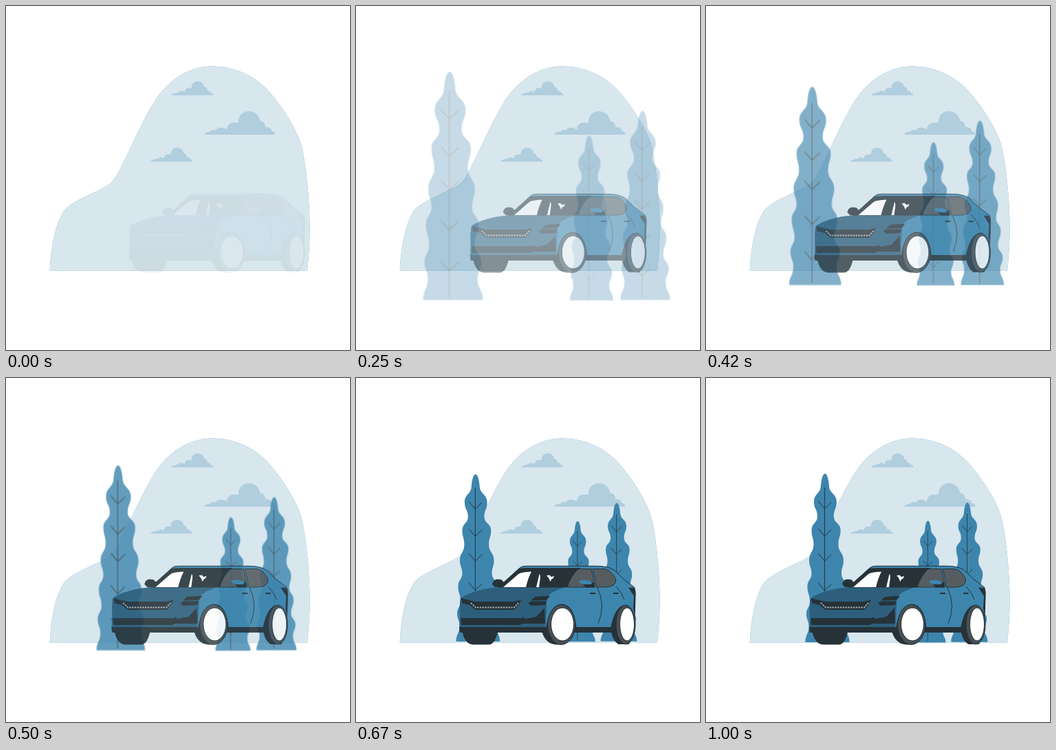
An HTML page for the animation above (1040 ms loop, 500x500 px).

```html
<!DOCTYPE html>
<html lang="en">
<head>
<meta charset="utf-8">
<title>Car arriving</title>
<style>
  html, body { margin: 0; width: 100%; height: 100%; overflow: hidden; background: #fff; }
  svg { display: block; width: 100vw; height: 100vh; }
  .blue { fill: #3d85ad; }
  .shade { fill: #2d5f7c; }
  .dark { fill: #263238; }
  .glass { fill: #565d61; stroke: #263238; }
  .tyre { fill: #465055; stroke: #263238; }
  .white { fill: #fff; }
  .line { fill: none; stroke: #263238; }
</style>
</head>
<body>
<svg viewBox="0 0 500 500">
  <defs>
    <path id="blob" d="M63.700 384.500C66 345 72 317 84 298C98 281 132 272 152 258C167 244 188 184 215 140C236 106 268 87.500 300 87.500C330 88 356 99 375 117C395 136 423 177 430 205C437 236 442 290 441.500 326C441.500 345 440 365 438 384.500Z"/>
    <path id="cloud" fill="#b1cede" d="M0 34C2 30 6 29 9 30C10 27 14 26 17 28C19 23 28 22 33 27C33 20 39 15 44 17C46 16 48 16 50 17C49 7 56 0 65 0C74 0 81 7 81 14C86 14 89 18 89 23C95 23 99 26 98 29C102 29 104 32 103 34Z"/>
    <g id="tree">
      <path id="leaf" class="blue"/>
      <path id="veins" class="line"/>
    </g>
  </defs>

  <use href="#blob" class="blue"/>
  <use href="#blob" fill="#fff" fill-opacity=".8"/>
  <use href="#cloud" transform="translate(240 109.5) scale(.594)"/>
  <use href="#cloud" transform="translate(288 153)"/>
  <use href="#cloud" transform="translate(210 206) scale(.594)"/>

  <g id="trees">
    <use href="#tree" transform="translate(172.9 139)"/>
    <use href="#tree" transform="translate(322.6 207.5) scale(.722)"/>
    <use href="#tree" transform="translate(379.9 181) scale(.828)"/>
  </g>

  <g id="car">
    <!-- far front tyre and body -->
    <path class="dark" d="M153.500 364H207Q203 387.500 193 387.500H170Q157 387 153.500 364Z"/>
    <path class="blue" d="M150.500 368L151 345Q150 330 153 319C165 311 185 306 208 304L238 276Q241 273 247 273H350Q366 273 375 279Q388 293 405 304.500Q407 308 406 318L405 348L403 366L370 370H285Z"/>
    <path class="line" d="M207 304L238 276Q241 273.300 247 273.300H350Q366 273.300 375 279Q388 293 405 304.500"/>
    <path class="shade" d="M152 320C165 311 185 306 208 304H305C290 308 282 313 277 319L277 333L275 364H150.500L151 345Q150 330 152 320Z"/>

    <!-- windscreen and windows -->
    <path class="dark" d="M206 304.500L237 277Q241 276 250 276H326Q312 288 307 304.500Z"/>
    <path class="white" d="M214 304L236 285Q239 282 255 281.500Q250 291 247 304Z"/>
    <path class="white" d="M262 304L266.500 285Q268.500 286 267.500 293L266 304ZM277 287L281.500 286.500L283.500 289L288 288Q287 292.500 284.500 292L282.500 296Q281 291 277 287Z"/>
    <path class="glass" d="M307 304Q312 288 323 277.500H342Q345.500 291 347 304Z"/>
    <path class="glass" d="M344 277.500H362Q370 279 377 291Q379 297 374 301Q370 304 362 304H349Q348 291 344 277.500Z"/>
    <path class="dark" d="M198 300Q199 293 205 292.500L211 293L215 297L208 304H202Z"/>
    <path class="dark" d="M329 299L341 296L347 298V304.500H334Z"/>
    <path class="blue" d="M324 295.500Q326 293 333 293.500Q343 294.500 343 298Q343 300.500 336 300Q326 300.500 324 295.500Z"/>

    <!-- grille and lamps -->
    <path class="dark" d="M163 322.500L173 325H230L240 322.500L237 329L230 337H174L166 331Z"/>
    <path fill="none" stroke="#a9b4b9" stroke-width="1.800" stroke-dasharray="2.400 1.400" d="M167 327L174 333.500H230L237 326"/>
    <path class="dark" d="M153 320L164 323L165 330L154 327Z"/>
    <path class="dark" d="M260 318L282 316.500L277 323L254 323.500ZM250 327L255 324.500H277L275 330L254 331Z"/>

    <!-- bumper and sills -->
    <path class="dark" d="M152 349H241L243 347L246 350L262 347L274 334L275 357L242 357L238 359H153Z"/>
    <path class="dark" d="M150 362H276L285 370H151ZM318 362H372V370H316Z"/>

    <!-- panel lines -->
    <path class="line" d="M351 305Q357 317 357.500 331Q357 345 352 357M378 303Q387 313 390 322"/>
    <path class="line" stroke-width="1.800" d="M340 313H348M374 313H381.500"/>
    <path class="dark" d="M396 304.500L405 305Q407 309 406.500 318L405.500 348L403 335L404 317Z"/>

    <!-- near wheels -->
    <path class="dark" d="M276 363C279 343 287 329 299 328.500C312 329 319 343 320.500 364L314 378L287 387Z"/>
    <path class="dark" d="M370 364C374 342 382 330 391 330C400 331 405 343 406 360L397 387H381Q372 381 370 364Z"/>
    <path class="dark" d="M270 368H286L299 387.500H290Q275 386 270 368Z"/>
    <ellipse class="tyre" cx="298.500" cy="358.500" rx="20" ry="29"/>
    <ellipse class="white" stroke="#263238" cx="300" cy="358" rx="16.500" ry="24"/>
    <ellipse class="tyre" cx="392" cy="358.500" rx="14" ry="28.500"/>
    <ellipse class="white" stroke="#263238" cx="394" cy="358" rx="10.500" ry="24"/>
  </g>
</svg>
<script>
  const byId = id => document.getElementById(id);

  // Half-widths of a tree from tip to foot: [y, left, right]
  const outline = [
    [17, 6, 6], [41, 16, 17], [62, 11, 12.8], [82, 19.5, 22.7], [103, 16.5, 19.5],
    [126, 23, 27], [145, 19.5, 24], [164, 25.5, 31], [186, 22, 27],
    [204, 27, 34], [222, 23.5, 30], [245, 28.5, 35.7]
  ];
  const left = outline.map(([y, l]) => [-l, y]).reverse();
  const right = outline.map(([y, , r]) => [r, y]);

  // Waves whose tangents are vertical at every point
  const wave = pts => pts.slice(1).map(([x, y], i) => {
    const [px, py] = pts[i], mid = (y + py) / 2;
    return `C${px} ${mid} ${x} ${mid} ${x} ${y}`;
  }).join('');

  byId('leaf').setAttribute('d',
    `M${left[0]}${wave(left)}C-4 -5.67 4 -5.67 6 17${wave(right)}Z`);
  byId('veins').setAttribute('d', 'M-.5 20V242.5' +
    [51, 91, 127, 170, 214].map(y => `M-9.7 ${y - 11}L-.5 ${y}L9.2 ${y - 9.5}`).join(''));

  const bezier = (x1, y1, x2, y2) => {
    const at = (a, b, s) => 3 * (1 - s) ** 2 * s * a + 3 * (1 - s) * s * s * b + s ** 3;
    return x => {
      let lo = 0, hi = 1;
      for (let i = 0; i < 24; i++) {
        const mid = (lo + hi) / 2;
        if (at(x1, x2, mid) < x) lo = mid; else hi = mid;
      }
      return at(y1, y2, hi);
    };
  };
  const settle = bezier(.36, -.01, .5, 1.38);

  const LOOP = 1040, STEPS = 25, STEP = LOOP / STEPS, LEAD = 35;
  const PIVOT_X = 276.8, PIVOT_Y = 261.5;

  function pose(id, opacity, transform) {
    byId(id).setAttribute('opacity', Math.max(0, Math.min(1, opacity)));
    byId(id).setAttribute('transform', transform);
  }

  const start = performance.now();
  function draw() {
    const t = (performance.now() - start) % LOOP;
    const step = Math.min(STEPS - 1, Math.floor((t + 5) / STEP));
    const time = step * STEP + LEAD;

    const grow = settle(Math.min(1, time / 1000));
    const scale = 1.5 - .5 * grow;
    pose('trees', grow,
      `translate(${PIVOT_X} ${PIVOT_Y}) scale(${scale}) translate(${-PIVOT_X} ${-PIVOT_Y})`);

    const slide = Math.min(1, time / 600);
    pose('car', slide, `translate(${30 * (1 - slide)} 0)`);
    requestAnimationFrame(draw);
  }
  draw();
</script>
</body>
</html>
```
